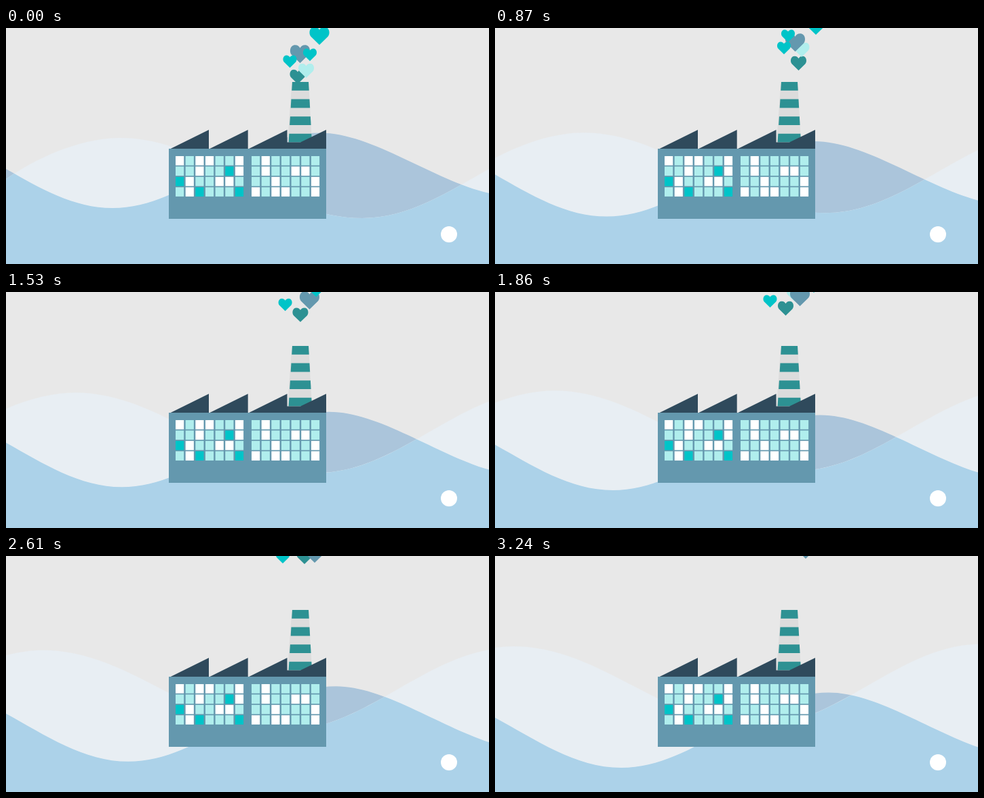
Animation of 712x350 px, one loop 3.27 s. Source, as an HTML page with a canvas:

```html
<!DOCTYPE html>
<html lang="en">
<head>
<meta charset="utf-8">
<title>Factory of hearts</title>
<style>
  html, body { margin: 0; width: 100%; height: 100%; overflow: hidden; background: #e8e8e8; }
  canvas { display: block; width: 712px; height: 350px; }
</style>
</head>
<body>
<canvas id="stage" width="712" height="350"></canvas>
<script>
const LOOP = 3270, STEP = 30;
const ctx = document.getElementById('stage').getContext('2d');

const WALL = '#6498ae', ROOF = '#2f4a5c', TEAL = '#2d9193', CYAN = '#00c4c8', PALE = '#b0eeed';

// Wave outlines at the start of the loop; each one drifts in a straight line.
const waveA = new Path2D(`M-149 155.5 C-38 155.5 46 267 157 267 S352 155.5 463 155.5
  C540 155.5 630 226 712 245 L900 289 V600 H-149 Z`);
const waveB = new Path2D(`M-60 265 L0 224 C58 184 120 163 168 163 C298 163 395 282 525 282
  C646 282 737 159.5 858 159.5 L1000 180 V600 H-60 Z`);
const driftA = { x: 29, y: 47 }, driftB = { x: -141, y: -29 };

// Unit-wide heart with its tip at the origin.
const heart = new Path2D(`M0 0 L-.43 -.42 C-.56 -.56 -.52 -.92 -.25 -.92
  C-.13 -.92 -.04 -.85 0 -.77 C.04 -.85 .13 -.92 .25 -.92 C.52 -.92 .56 -.56 .43 -.42 Z`);

// Tip positions at the key times, back to front.
const times = [0, 450, 870, 1230, 1860, 2610, 3240];
const hearts = [
  { size: 23, color: TEAL,
    x: [430, 439.5, 447.5, 441.5, 428.5, 440, 450], y: [83, 73, 63, 53, 35, 12, -8] },
  { size: 23, color: PALE,
    x: [442.5, 447.5, 452, 453.5, 441.5, 432], y: [74, 58, 43, 32, 14, -8] },
  { size: 29, color: WALL,
    x: [433.5, 438.5, 442.5, 445.5, 449.5, 455, 458], y: [52, 43, 35, 30, 21, 10, 4] },
  { size: 20, color: CYAN,
    x: [418.5, 422, 426, 419, 405.5, 408, 414], y: [59, 49, 39, 33, 23, 11, -1] },
  { size: 29, color: CYAN,
    x: [462, 467.5, 473, 476.5, 483], y: [25, 17, 10, 4, -7] },
  { size: 20, color: CYAN,
    x: [448, 440.5, 432, 444, 470, 480], y: [49, 34, 21, 13, 1, -14] }
];

// W white, L pale, C cyan
const windows = [
  { x: 250, rows: ['WLWWLLW', 'LLWLLCW', 'CWLLWWL', 'LWCLLLC'] },
  { x: 362, rows: ['LWLLLLL', 'LWLLWWL', 'LLWLLLW', 'WLWWLLW'] }
];
const glass = { W: '#ffffff', L: PALE, C: CYAN };

// Smooth curve through the values at the key times.
function spline(v, t) {
  const last = v.length - 1;
  if (t >= times[last]) return v[last];
  let i = 0;
  while (t >= times[i + 1]) i++;
  const slope = k => {
    const a = Math.max(k - 1, 0), b = Math.min(k + 1, last);
    return (v[b] - v[a]) / (times[b] - times[a]);
  };
  const h = times[i + 1] - times[i], u = (t - times[i]) / h, w = 1 - u;
  return w * w * ((1 + 2 * u) * v[i] + u * h * slope(i))
       + u * u * ((3 - 2 * u) * v[i + 1] - w * h * slope(i + 1));
}

function poly(color, ...pts) {
  ctx.fillStyle = color;
  ctx.beginPath();
  for (let i = 0; i < pts.length; i += 2) ctx.lineTo(pts[i], pts[i + 1]);
  ctx.fill();
}

function rect(color, x, y, w, h) {
  ctx.fillStyle = color;
  ctx.fillRect(x, y, w, h);
}

function shifted(path, drift, p) {
  const out = new Path2D();
  out.addPath(path, new DOMMatrix().translate(drift.x * p, drift.y * p));
  return out;
}

function drawWaves(t) {
  const p = t / 3240;
  const a = shifted(waveA, driftA, p), b = shifted(waveB, driftB, p);
  ctx.fillStyle = '#abc5db';
  ctx.fill(a);
  ctx.fillStyle = '#e8eef3';
  ctx.fill(b);
  ctx.save();
  ctx.clip(a);
  ctx.fillStyle = '#acd2e9';
  ctx.fill(b);
  ctx.restore();
}

function drawHearts(t) {
  for (const { size, color, x, y } of hearts) {
    ctx.save();
    ctx.translate(spline(x, t), spline(y, t));
    ctx.scale(size, size);
    ctx.fillStyle = color;
    ctx.fill(heart);
    ctx.restore();
  }
}

function drawChimney() {
  const top = 80, band = 12.8;
  const left = y => 422 - (y - top) * 0.06, right = y => 446 + (y - top) * 0.056;
  poly('#dcdcdc', 421.5, top, 446, top, 451, 169.5, 415, 169.5);
  for (let i = 0; i < 7; i += 2) {
    const y = top + i * band, end = y + band;
    poly(TEAL, left(y), y, right(y), y, right(end), end, left(end), end);
  }
}

function drawFactory() {
  for (const x of [299, 356.7, 414.5]) poly(ROOF, x - 57.3, 179.5, x, 151, x, 179.5);
  poly(ROOF, 414, 169.6, 434, 169.6, 472, 151, 472, 179.5, 414, 179.5);
  rect(WALL, 240, 179, 232, 104);
  for (const { x, rows } of windows)
    rows.forEach((row, r) => [...row].forEach((c, i) =>
      rect(glass[c], x + i * 14.65, 190 + r * 15.4, 12.2, 13.7)));
}

function drawBadge() {
  ctx.fillStyle = '#ffffff';
  ctx.beginPath();
  ctx.arc(653, 306, 12, 0, Math.PI * 2);
  ctx.fill();
}

function draw(t) {
  rect('#e8e8e8', 0, 0, 712, 350);
  drawWaves(t);
  drawHearts(t);
  drawChimney();
  drawFactory();
  drawBadge();
}

const start = performance.now();
function tick() {
  const t = (performance.now() - start) % LOOP;
  draw(Math.floor(t / STEP) * STEP);
  requestAnimationFrame(tick);
}
tick();
</script>
</body>
</html>
```
